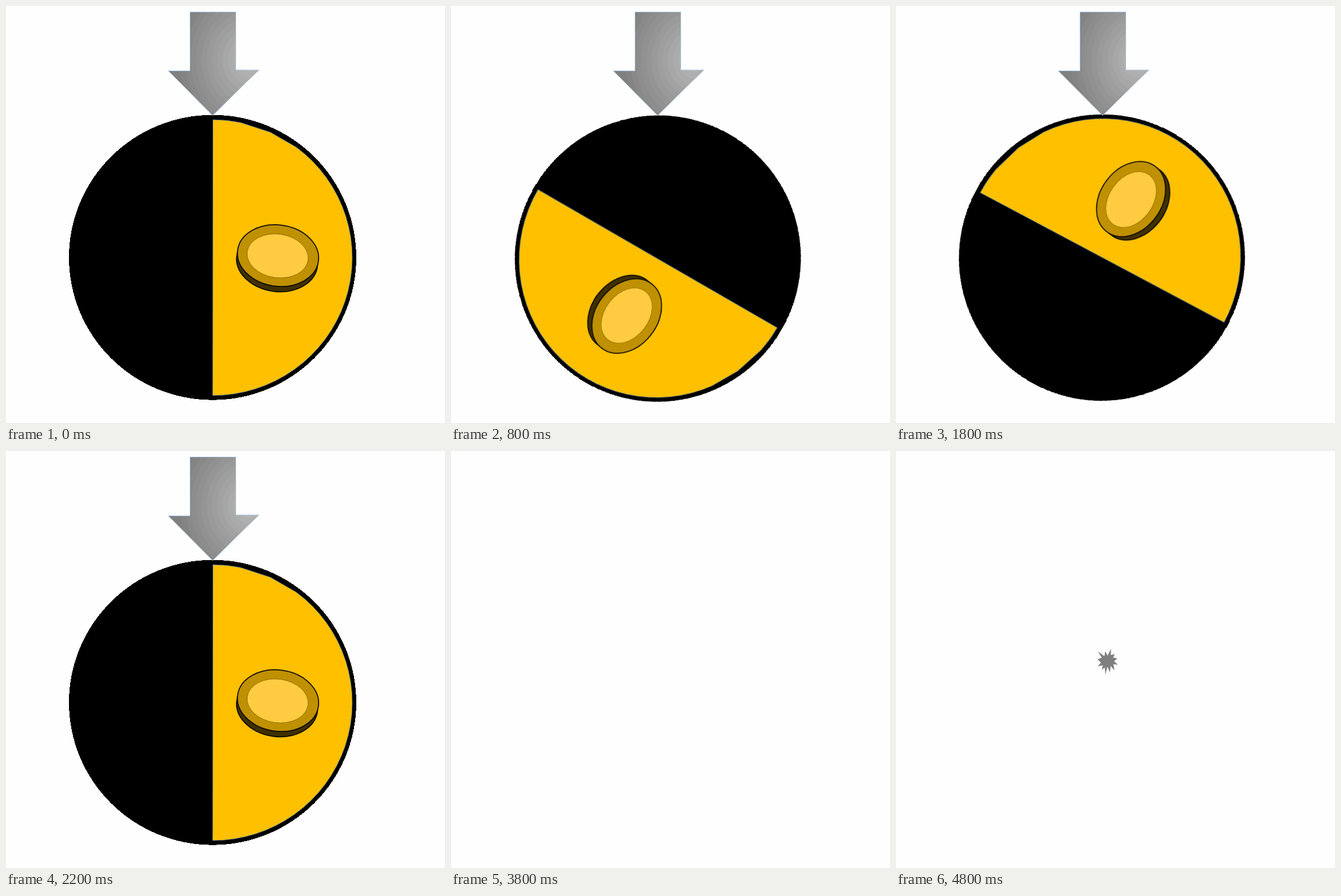
These frames come from a looping animation (767 px wide and 730 px high, 5 s). An HTML page:

```html
<!DOCTYPE html>
<html lang="en">
<head>
<meta charset="utf-8">
<title>Spinning wheel</title>
<style>
  html, body { margin: 0; width: 100%; height: 100%; overflow: hidden; background: #fefefe; }
  svg { display: block; width: 767px; height: 730px; }

  .scene, .wheel, .burst { animation: 5s step-end infinite; }
  .scene { animation-name: show; }
  .wheel { animation-name: spin; transform-origin: 360.6px 441.3px; }
  .burst { animation-name: shrink; fill: #7f7f7f; }

  @keyframes show {
    0% { visibility: visible; }
    76%, 100% { visibility: hidden; }
  }
  /* full turn, then slowing to a stop */
  @keyframes spin {
    0% { transform: rotate(0deg); }
    4% { transform: rotate(30deg); }
    8% { transform: rotate(60deg); }
    12% { transform: rotate(90deg); }
    16% { transform: rotate(120deg); }
    20% { transform: rotate(157deg); }
    24% { transform: rotate(195deg); }
    28% { transform: rotate(233deg); }
    32% { transform: rotate(266deg); }
    36% { transform: rotate(298deg); }
    40% { transform: rotate(329deg); }
    44% { transform: rotate(360deg); }
    48% { transform: rotate(368deg); }
    52% { transform: rotate(373deg); }
    60% { transform: rotate(377deg); }
    72%, 100% { transform: rotate(380deg); }
  }
  /* the burst path fills a 21600-unit box */
  @keyframes shrink {
    0% { visibility: hidden; transform: scale(0); }
    80% { visibility: visible; transform: translate(211px, 200px) scale(.015694, .015278); }
    84% { visibility: visible; transform: translate(259px, 211px) scale(.012037, .012083); }
    88% { visibility: visible; transform: translate(276px, 253px) scale(.010278, .009028); }
    92% { visibility: visible; transform: translate(334px, 273px) scale(.005556, .006343); }
    96%, 100% { visibility: visible; transform: translate(352px, 346px) scale(.001644, .002106); }
  }
</style>
</head>
<body>
<svg viewBox="0 0 767 730">
  <defs>
    <path id="arrow" d="M321.5 10.5H401.5V112H441.5L361 191.5L283.5 113.5H321.5Z"/>
    <clipPath id="arrowClip"><use href="#arrow"/></clipPath>
  </defs>

  <g class="scene">
    <g class="wheel">
      <ellipse cx="361" cy="440.2" rx="251" ry="249.5" shape-rendering="crispEdges"/>
      <path fill="#ffc000" stroke="#41719c" stroke-width=".9"
        d="M361.5 199A244 241.5 0 0 1 410 204L462 221L507 247A244 241.5 0 0 1 361 682Z"/>
      <g stroke="#0a0800" stroke-width="1.7">
        <path fill="#403000" d="M404.8 428L402.6 442A71.3 53.6 7.8 0 0 543.5 460L546 443Z"/>
        <ellipse cx="475.3" cy="437" rx="71.2" ry="53.6" fill="#bf9000" transform="rotate(7.8 475.3 437)"/>
        <ellipse cx="474.6" cy="437.5" rx="53.6" ry="38.2" fill="#ffcb40" stroke="#7f6000" stroke-width=".8"
          transform="rotate(7.8 474.6 437.5)"/>
      </g>
    </g>
    <g id="bands" clip-path="url(#arrowClip)"></g>
    <use href="#arrow" fill="none" stroke="#a9c6e6"/>
  </g>

  <path class="burst" d="M10800 5800L14522 0L14155 5325L18380 4457L16702 7315L21097 8137L17607 10475
    L21600 13290L16837 12942L18145 18095L14020 14457L13247 19737L10532 14935L8485 21600L7715 15627
    L4762 17617L5667 13937L135 14587L3722 11775L0 8615L4627 7617L370 2295L7312 6320L8352 2295Z"/>
</svg>
<script>
  // Stepped radial shading of the arrow, darkest ring first.
  const bands = document.getElementById('bands');
  const COUNT = 14;
  for (let i = COUNT; i > 0; i--) {
    const r = i / COUNT;
    const grey = Math.round(188 - 60 * r);
    const ring = document.createElementNS('http://www.w3.org/2000/svg', 'ellipse');
    const size = i === COUNT ? 2 : r;
    const attrs = { cx: 425, cy: 95, rx: 130 * size, ry: 150 * size, fill: `rgb(${grey},${grey},${grey})` };
    for (const key in attrs) ring.setAttribute(key, attrs[key]);
    bands.append(ring);
  }
</script>
</body>
</html>
```
